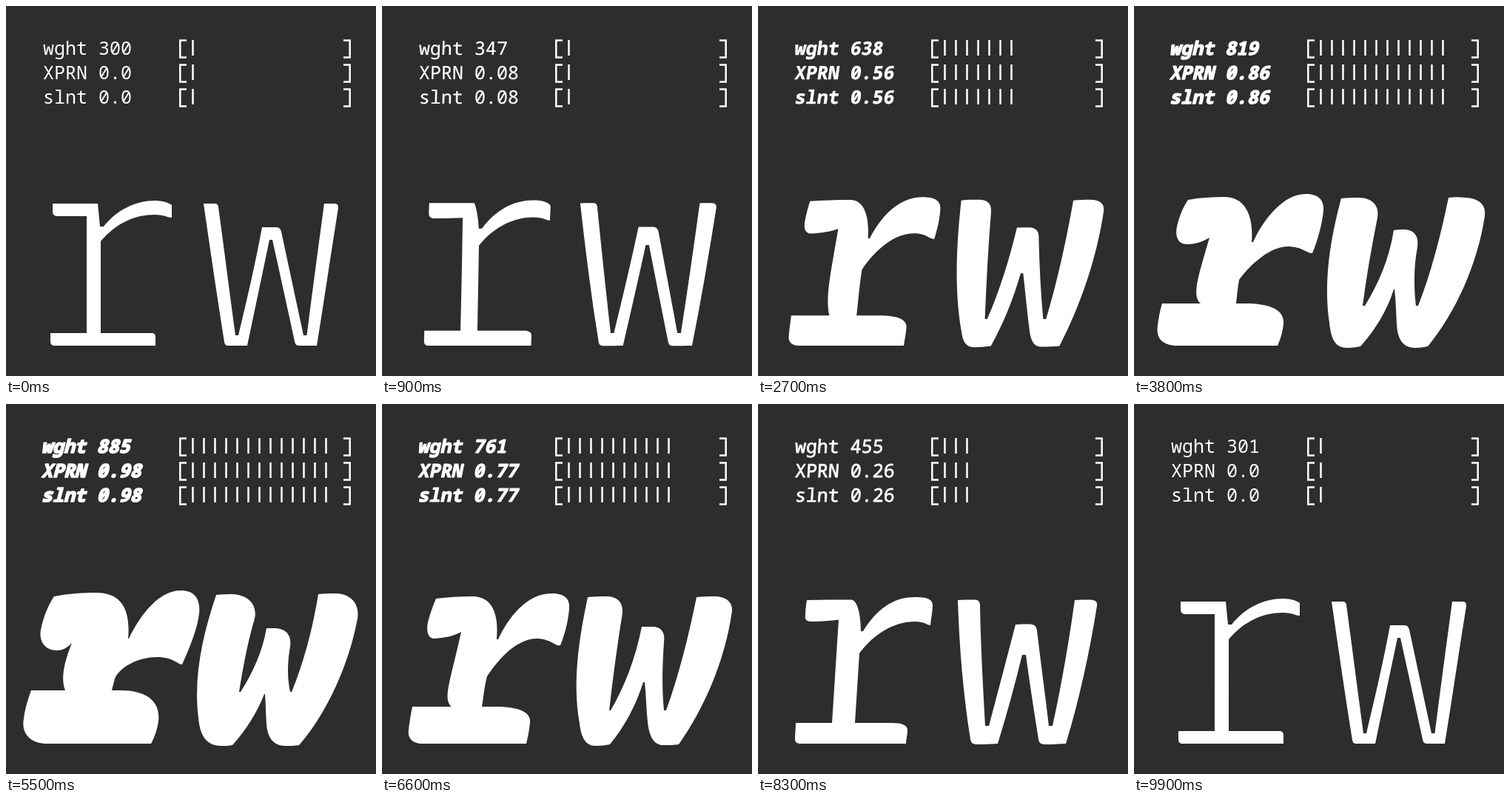
An HTML page that plays this animation: 500 px wide and 500 px high, repeating every 10 s.

```html
<!DOCTYPE html>
<html lang="en">
<head>
<meta charset="utf-8">
<title>Variable letters</title>
<style>
  html, body { margin: 0; width: 100%; height: 100%; overflow: hidden; background: #2d2d2d; }
  svg { display: block; width: 100vw; height: 100vh; }
  text { font: 25px "Noto Sans Mono", "DejaVu Sans Mono", monospace; white-space: pre; stroke: #fff; stroke-linejoin: round; }
  .bars { fill: none; stroke: #fff; stroke-width: 2.5; }
</style>
</head>
<body>
<svg viewBox="0 0 500 500" fill="#fff">
  <g id="rows"></g>
  <path id="r"/>
  <path id="w"/>
</svg>
<script>
const LOOP = 10000, STEP = 100, CELL = 15, SLOTS = 14;

// Outlines of each letter at these amounts, all with the same path commands.
const stops = [0, 0.259, 0.768, 0.8645, 0.9755];

const rPoses = [
  `M63 267 C83 267 104 267 124 267 C125 277 126 288 127 298 L132 298
   C150 275 176 263 201 263 C209 263 219 265 224 269 C224 275 224 280 224 286
   C218 286 214 282 201 282 C175 282 149 293 128 318 C128 359 128 401 128 442
   C151 442 174 442 197 442 C200 442 202 444 202 447 C202 451 202 455 202 459
   L66 459 C62 459 60 457 60 453 C60 449 60 446 60 442 L109 442
   C109 389 109 337 109 284 C96 284 83 284 70 284 C66 284 63 282 63 278 C63 274 63 271 63 267`,
  `M66 265 C86 264.5 107 264.5 126 264.5 C134 264.5 139 284 139 307 L142 307
   C160 278 182 261 212 261 C224 261 236 262 236 272 C236 279 234 290 233 298.5
   C229 300 227 294 212 294 C184 294 156 311 137 337 C135 368 133 400 131 431
   C148 431 165 431 181 431 C195 431 202 434 202 441 C202 447 200 453 200 459
   L58 459 C52 459 50 457 50 452 C50 445 51 438 51 431 L100 431
   C103 384 106 338 109 291.5 C98 293 85 294 73 294 C65 294 63 291 64 285 C64 278 65 271 66 265`,
  `M73 263 C89 261 106 260 122 260 C150 260 158 285 155 318 L157 318
   C170 290 195 256 229 256 C247 256 254 263 253 276 C252 292 247 312 241 326
   C234 328 228 317 209 317 C184 317 160 341 142 368 C138 383 137 398 135 409
   C141 409 147 409 153 409 C182 409 202 415 200 431 C199 441 197 450 195 459
   L55 459 C42 459 34 452 36 440 C37 430 39 419 41 409 L94 409
   C82 398 92 376 107 308 C96 314 84 316 71 317 C61 317 60 305 62 295 C65 283 69 272 73 263`,
  `M73 262 C89 259 106 258 122 258 C150 258 162 283 159 319 L161 319
   C175 288 202 254 232 254 C250 254 257 263 256 276 C255 292 248 318 241 334
   C235 335 227 325 208 325 C185 325 159 347 142 370 C140 382 139 392 138 402
   C142 402 146 402 150 402 C183 402 204 410 202 430 C201 440 198 450 194 459
   L59 459 C41 459 29 451 32 432 C33 422 35 412 38 402 L90 402
   C78 392 86 368 102 313 C92 319 82 322 71 322 C60 322 55 312 58 298 C61 285 66 272 73 262`,
  `M65 260 C85 256 105 255 122 255 C153 255 169 274 165 317 L166 317
   C182 284 207 252 236 252 C256 252 263 265 261 283 C259 303 248 330 238 352
   C232 352 226 342 204 342 C180 342 155 354 147 371 C146 376 144 382 143 387
   C147 387 151 387 155 387 C190 387 209 402 206 428 C205 438 201 450 196 459
   L56 459 C34 459 20 446 24 425 C26 410 30 398 34 387 L80 387
   C73 370 80 345 89 323 C84 328 78 333 68 333 C54 333 44 322 47 305 C51 286 57 272 65 260`
];

const wPoses = [
  `M267 267 C272 267 277 267 282 267 C285 267 287 269 287 272 C295 330 302 387 310 445 L314 445
   C326 395 337 348 346 299 C353 299 360 299 366 299 C369 299 371 301 372 305 C382 352 392 398 402 445 L406.5 445
   C414 386 422 326 430 267 C435 267 440 267 444 267 C448 267 449 269 449 273 C439 335 430 397 420 459
   C412 459 405 459 397 459 C393 459 391 458 390 453 C380 407 370 361 360 316 L356 316
   C346 364 336 411 326 459 C318 459 310 459 301 459 C297 459 296 458 295 454 C285 392 276 329 267 267`,
  `M270 265 C278 264.5 285 264.5 292 264.5 C298 264.5 300 267 300 272 C301 328 304 380 307 435 L312 435
   C324 390 336 344 348 298 C355 297.5 361 297.5 367 297.5 C374 298 376 300 377 306 C382 349 388 392 393 435 L398 435
   C410 380 420 322 428 265 C435 264.5 442 264.5 449 264.5 C456 265 459 267 458 273 C448 336 434 400 416 459
   C406 459.5 397 460 388 460 C382 460 380 458 379 453 C373 415 367 377 362 339 L357 339
   C347 380 336 420 324 459 C315 459.5 306 460 297 460 C290 460 288 458 287 453 C277 390 272 327 270 265`,
  `M278 261 C286 260 295 260 303 260 C318 260 326 268 325 282 C318 325 312 370 307 414 L309 414
   C328 382 343 342 351 301 C356 301 361 301 366 301 C378 301 383 310 381 322 C379 352 378 382 381 414 L384 414
   C400 370 414 316 425 261 C433 260 440 260 448 260 C466 260 474 268 473 280 C463 350 434 413 401 460
   C394 461 388 461 382 461 C366 462 361 447 359 430 C357 412 357 394 355 376 L353 376
   C343 408 327 437 308 460 C302 461 295 462 289 462 C274 462 269 449 267 432 C257 375 266 318 278 261`,
  `M280 260 C288 259 295 259 303 259 C322 259 332 270 329 286 C321 326 314 366 309 405 L312 405
   C330 376 345 342 351 303 C356 302 361 302 366 302 C380 303 385 312 383 326 C378 352 378 380 381 405 L384 405
   C401 362 414 312 425 259 C433 258 440 258 448 259 C468 260 476 270 474 284 C464 350 434 415 397 460
   C391 461 385 462 380 462 C362 462 356 448 355 430 C354 415 354 398 352 383 L351 383
   C342 412 325 439 306 460 C300 461 294 462 288 462 C271 462 266 448 264 428 C256 372 265 316 280 260`,
  `M284 258 C291 257 299 257 306 257 C328 258 340 272 336 290 C326 324 320 358 315 389 L317 389
   C333 364 347 334 352 303 C357 303 361 303 365 303 C380 304 386 314 384 328 C380 350 380 370 384 389 L386 389
   C402 350 414 306 422 257 C430 256 438 256 446 256 C468 257 478 272 475 290 C464 350 434 418 396 461
   C390 462 383 462 378 462 C360 462 353 449 352 432 C351 418 351 405 350 392 L349 392
   C340 416 324 441 306 461 C301 462 296 462 291 462 C270 462 262 447 260 424 C253 368 266 312 284 258`
];

const NUMBER = /[\d.]+/g;

// Returns a function that gives the blended path for an amount.
function morph(poses) {
  const values = poses.map(d => d.match(NUMBER).map(Number));
  const last = stops.length - 1;
  const slope = (k, n) => {
    const a = Math.max(k - 1, 0), b = Math.min(k + 1, last);
    return (values[b][n] - values[a][n]) / (stops[b] - stops[a]);
  };
  return p => {
    let k = 0;
    while (k < last - 1 && p > stops[k + 1]) k++;
    const h = stops[k + 1] - stops[k], t = (p - stops[k]) / h, s = 1 - t;
    let n = 0;
    return poses[0].replace(NUMBER, () => {
      const v = s * s * (1 + 2 * t) * values[k][n] + t * t * (3 - 2 * t) * values[k + 1][n]
        + h * t * s * (s * slope(k, n) - t * slope(k + 1, n));
      n++;
      return v.toFixed(2);
    });
  };
}

const find = id => document.getElementById(id);
const letters = [[find("r"), morph(rPoses)], [find("w"), morph(wPoses)]];

function add(tag, attrs) {
  const el = document.createElementNS("http://www.w3.org/2000/svg", tag);
  for (const key in attrs) el.setAttribute(key, attrs[key]);
  return find("rows").appendChild(el);
}

const rows = ["wght", "XPRN", "slnt"].map((name, i) => {
  const base = 66 + 33 * i;
  add("path", { class: "bars", d: `M244 ${base - 19.5}h-8.7v23h8.7M456 ${base - 19.5}h8.7v23h-8.7` });
  return { name, base, label: add("text", { x: 0, y: 9 }), ticks: add("path", { class: "bars" }) };
});

function decimal(p) {
  const s = String(+p.toFixed(2));
  return s.includes(".") ? s : s + ".0";
}

function draw(time) {
  const step = Math.floor(time % LOOP / STEP);
  const p = (1 - Math.cos(2 * Math.PI * step * STEP / LOOP)) / 2;
  const count = Math.max(1, Math.floor(p * SLOTS + 1e-9));
  const bold = p >= 0.5;

  for (const [el, shape] of letters) el.setAttribute("d", shape(p) + "Z");

  for (const { name, base, label, ticks } of rows) {
    label.textContent = name + " " + (name === "wght" ? Math.round(300 + 600 * p) : decimal(p));
    label.setAttribute("transform", `translate(50 ${base - 9}) skewX(${-15 * p})`);
    label.style.fontWeight = bold ? 700 : 400;
    label.style.strokeWidth = bold ? 0.3 + 3 * (p - 0.5) : 3 * p;
    let d = "";
    for (let i = 0; i < count; i++) d += `M${252.5 + CELL * i} ${base - 20}v21`;
    ticks.setAttribute("d", d);
  }
}

const start = performance.now();
function tick() {
  draw(performance.now() - start);
  requestAnimationFrame(tick);
}
tick();
</script>
</body>
</html>
```
